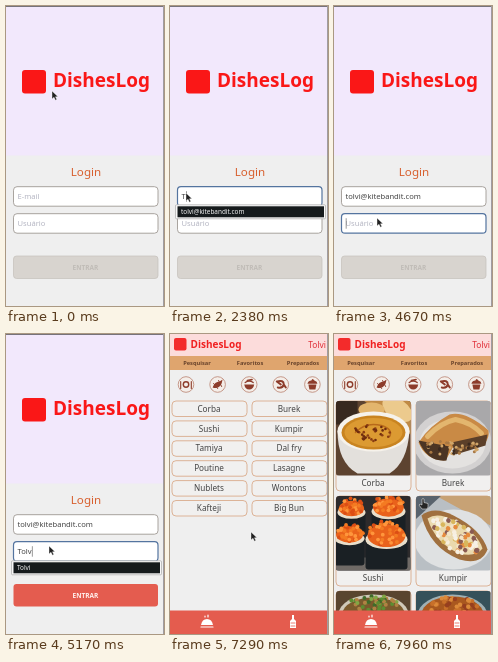
Animation of 158x300 px, one loop 8 s. Source, as an HTML page:

```html
<!DOCTYPE html>
<html lang="pt">
<head>
<meta charset="utf-8">
<style>
html, body { margin: 0; width: 100%; height: 100%; overflow: hidden; background: #efefef; }
svg { display: block; width: 100vw; height: 100vh; font-family: "Noto Sans", "Open Sans", sans-serif; }
.bold { font-weight: 700; }
</style>
</head>
<body>
<svg id="stage" viewBox="0 0 158 300"></svg>
<script>
const LOOP = 8000, NAME = 'Tolvi', MAIL = 'tolvi@kitebandit.com', APP = 'DishesLog';
const $ = id => document.getElementById(id);

// Markup helpers
const rect = (x, y, w, h, fill, r = 0, more = '') =>
  `<rect x="${x}" y="${y}" width="${w}" height="${h}" rx="${r}" fill="${fill}" ${more}/>`;
const oval = (x, y, rx, ry, fill, more = '') =>
  `<ellipse cx="${x}" cy="${y}" rx="${rx}" ry="${ry}" fill="${fill}" ${more}/>`;
const dot = (x, y, r, fill, more) => oval(x, y, r, r, fill, more);
const path = (d, fill, more = '') => `<path d="${d}" fill="${fill}" ${more}/>`;
const line = (d, color, w = 1) => path(d, 'none', `stroke="${color}" stroke-width="${w}" stroke-linecap="round"`);
const text = (x, y, size, fill, s, more = '') =>
  `<text x="${x}" y="${y}" font-size="${size}" fill="${fill}" ${more}>${s}</text>`;
const mid = 'text-anchor="middle"', boldMid = mid + ' class="bold"';
const group = (id, body) => `<g id="${id}">${body}</g>`;
const at = (x, y, body) => `<g transform="translate(${x} ${y})">${body}</g>`;

let seed = 7;
const rnd = () => (seed = seed * 16807 % 2147483647) / 2147483647;
const scatter = (n, x, y, rx, ry, size, colors) => Array.from({length: n}, () => {
  const a = rnd() * 6.28, d = Math.sqrt(rnd());
  return dot(x + rx * d * Math.cos(a), y + ry * d * Math.sin(a), size, colors[rnd() * colors.length | 0]);
}).join('');

// Login page
const field = (id, y, hint) =>
  rect(7.5, y, 144.5, 19.5, '#fff', 3.5, `id="${id}Box"`) +
  text(11.5, y + 12.2, 7.6, '#b4b5c2', hint, `id="${id}Text"`) +
  rect(0, y + 4.5, .6, 10.5, '#555', 0, `id="${id}Caret"`);
const popup = (id, y, s) => group(id,
  rect(5.5, y, 150, 14, '#f7f7f7', 1, 'stroke="#aaa" stroke-width=".7"') +
  rect(7.5, y + 1.5, 146.5, 11, '#151a1c') + text(11, y + 9.3, 6.4, '#f4f4f4', s));

const login = group('login',
  rect(0, 0, 158, 300, '#efefef') + rect(0, 0, 158, 149.5, '#f2e8fc') + rect(0, 0, 158, 1, '#77737b') +
  rect(16, 64, 24, 23.5, '#fa1717', 3) + text(47, 81, 19, '#fa1717', APP, 'class="bold"') +
  text(80, 170.3, 11.6, '#d8602f', 'Login', mid) +
  field('mail', 180.7, 'E-mail') + field('user', 207.7, 'Usuário') +
  group('button', rect(7.5, 250, 144.5, 22.5, '#d8d4cf', 3, 'id="face"') +
    text(79.5, 264, 6.5, '#fff', 'ENTRAR', boldMid + ' id="label"')) +
  popup('mailPop', 198.8, MAIL) + popup('userPop', 226.8, NAME));

// Flat food pictures, 75 by 75
const roll = (x, y, r, h) =>
  rect(x - r, y, r * 2, h, '#1a2024', 3) + oval(x, y + 1, r, r * .45, '#e9dfcb') +
  oval(x, y - 3, r * .9, r * .55, '#e9621b') +
  scatter(34, x, y - 5, r * .9, r * .6, 1.9, ['#f47b22', '#ff963c', '#dc4e14']);
const foods = [
  rect(0, 0, 75, 75, '#5d4330') + rect(0, 0, 22, 24, '#38291f') +
    path('M28 0H75V34L52 18Z', '#c08a45') + oval(62, 9, 17, 10, '#ecca8d', 'transform="rotate(35 62 9)"') +
    oval(36, 9, 13, 7, '#e3b56d') +
    path('M2 30Q2 62 22 73H54Q72 62 74 30Z', '#e3e0dc') + oval(38, 31, 36, 20, '#f6f2eb') +
    oval(38, 32, 32, 17, '#c98420') + oval(38, 32, 29, 14.5, '#dc9a32') +
    line('M20 32Q30 21 46 25Q58 29 54 36', '#b8691a', 1.6) +
    scatter(30, 36, 32, 19, 9, 1.3, ['#8a3d12', '#6f2c0e']),
  rect(0, 0, 75, 75, '#a9a8aa') + oval(37, 42, 39, 31, '#d3d1d1') + oval(37, 43, 33, 25, '#e4e2e0') +
    path('M3 42Q14 25 34 14Q50 10 73 30Q74 36 70 42L38 46L30 60Q10 60 3 42Z', '#c98a45') +
    line('M12 36Q25 22 40 19Q56 22 66 33', '#e3b66e', 5) +
    path('M3 40L34 46L31 60Q12 62 3 40Z', '#4c3524') + path('M36 42L72 34L70 45L40 54Z', '#5b3f29') +
    scatter(44, 36, 47, 31, 7, 1.5, ['#a97843', '#3c2a1f', '#d1a66a']),
  rect(0, 0, 75, 75, '#2d2b2c') + rect(0, 62, 75, 13, '#6f6a66') +
    roll(16, 16, 14, 22) + roll(53, 15, 17, 24) + roll(14, 42, 15, 28) + roll(51, 43, 21, 31),
  rect(0, 0, 75, 75, '#b9bfc4') + path('M20 0H75V30Z', '#c7a275') + path('M0 0H26L0 24Z', '#59636d') +
    oval(38, 44, 39, 30, '#dfe1e2') +
    path('M6 20Q18 10 38 20Q66 34 72 54Q66 70 44 64Q14 52 6 20Z', '#a0703f') +
    path('M12 23Q22 16 38 25Q62 37 67 53Q60 62 44 58Q20 48 12 23Z', '#ead9ae') +
    `<g transform="rotate(32 40 40)">` +
    scatter(70, 40, 40, 27, 14, 2.3, ['#f6f1e6', '#f2e3c6', '#e58a3e', '#d9b65c', '#8a5a52', '#f7efe0']) + '</g>',
  rect(0, 0, 75, 75, '#59452f') + oval(38, 24, 35, 20, '#cfc9b8') + oval(38, 23, 31, 16, '#7b5a2c') +
    scatter(45, 38, 13, 25, 8, 2, ['#5d8d31', '#3f6b2a', '#b08243', '#81a744']),
  rect(0, 0, 75, 75, '#35515a') + oval(37, 25, 35, 21, '#9fb0b4') + oval(37, 24, 31, 18, '#a9581f') +
    scatter(40, 37, 15, 25, 9, 2.2, ['#dc8a3a', '#963f1f', '#c8702a'])
];

const dishes = ['Corba', 'Burek', 'Sushi', 'Kumpir', 'Tamiya', 'Dal fry',
  'Poutine', 'Lasagne', 'Nublets', 'Wontons', 'Kafteji', 'Big Bun'];
const cards = dishes.map((s, i) => group('card' + i,
  rect(.5, .5, 75, 15.5, '#f1f0ef', 4, `stroke="#d7a481" stroke-width=".8" id="frame${i}"`) +
  `<g id="photo${i}" clip-path="url(#crop)">${foods[i] || ''}</g>` +
  text(37.5, 11.2, 8.2, '#444', s, `${mid} id="dish${i}"`))).join('');

const brown = '#8d3c2b';
const icons = [
  dot(0, 0, 3.4, brown) + dot(0, 0, 2, '#f4eee9') + line('M-5.3 -3V4M5.3 -3V4', brown, 1.1),
  path('M-5 3Q-3 -3 2 -3L5 -5L4 -1Q1 5 -5 3Z', brown) + line('M-4 -1L0 4M1 -4L4 2', brown),
  path('M-5 0H5Q4 5 0 5Q-4 5 -5 0Z', brown) + line('M-4 -2Q0 -5 4 -2M-2 -4L3 -5', brown, 1.3),
  line('M-4 -3Q3 -5 3 0Q2 4 -3 3M-4 -3L0 0M3 0L5 3', brown, 2),
  path('M-4 0H4L3 5H-3Z', brown) + path('M-5 -.7Q-4 -4 -1 -4Q0 -7 2 -4Q5 -3 5 -.7Z', brown)
].map((s, i) => at(16 + i * 31.6, 50.5, dot(0, 0, 7.8, '#f4eee9', 'stroke="#b98270" stroke-width=".8"') + s)).join('');

const home = group('home',
  rect(0, 0, 158, 300, '#efefef') + cards + icons +
  rect(0, 0, 158, 22, '#fcdcdb') + rect(4, 4, 12.5, 12.5, '#f32b2b', 2) +
  text(20.5, 13.8, 10, '#f02020', APP, 'class="bold"') + text(156, 14.3, 8.4, '#e02c35', NAME, 'text-anchor="end"') +
  rect(0, 22, 158, 14, '#dfa56e') +
  ['Pesquisar', 'Favoritos', 'Preparados'].map((s, i) =>
    text(27 + i * 53, 31.2, 5.7, '#68432b', s, boldMid)).join('') +
  rect(0, 276.5, 158, 23.5, '#e45c4e') +
  at(37, 288, path('M-6 3Q-5 -3 0 -3Q5 -3 6 3Z', '#fff') + line('M-6 5H6M-2 -5V-6M1 -5V-7', '#fff', 1.2)) +
  at(123, 288, path('M-1 -7H1V-3L3 -1V6H-3V-1L-1 -3Z', '#fff') + line('M-2 1H2M-2 4H2', '#e45c4e', .8)));

const pointer = group('pointer',
  group('arrow', path('M0 0V8L2 6.3L3.4 9.2L4.8 8.5L3.5 5.8H6Z', '#222', 'stroke="#fff" stroke-width=".4"')) +
  group('beam', line('M-2 0H2M0 0V8M-2 8H2', '#a4a4ac', .8)) +
  group('hand', path('M-1 0Q0 -1 1 0V3.5L5 4.5V8L4 10H-1L-4 6L-3 5L-1 6Z', '#252525', 'stroke="#fff" stroke-width=".5"')));

$('stage').innerHTML = '<clipPath id="crop"><rect x=".5" y=".5" width="75" height="75" rx="3"/></clipPath>' +
  login + home + rect(157, 0, 1, 300, '#a09da2') + pointer;

// State over time
const show = (id, on) => $(id).style.display = on ? '' : 'none';
const set = (id, o) => { for (const k in o) $(id).setAttribute(k, o[k]); };
const track = [[0, 46, 85], [590, 46, 85], [1000, 38, 120], [1700, 16, 187], [2480, 16, 187], [2850, 40, 204],
  [3710, 46, 204], [4080, 43, 212], [5400, 43, 212], [6050, 74, 264], [6700, 74, 264], [7200, 81, 198],
  [7400, 81, 198], [7780, 89, 165], [8000, 89, 165]];
const loaded = [7380, 7540, 7680];

function mouseAt(t) {
  const i = track.findIndex(k => k[0] > t), [t0, x0, y0] = track[i - 1], [t1, x1, y1] = track[i];
  const u = (t - t0) / (t1 - t0), e = u * u * (3 - 2 * u);
  return [x0 + (x1 - x0) * e, y0 + (y1 - y0) * e];
}

function drawField(id, value, hint, focus) {
  const el = $(id + 'Text');
  el.textContent = value || hint;
  set(id + 'Text', {fill: value ? '#444' : '#b4b5c2'});
  set(id + 'Box', {stroke: focus ? '#54749f' : '#a09a95', 'stroke-width': focus ? 1.2 : .9});
  show(id + 'Caret', focus);
  if (focus) set(id + 'Caret', {x: 11.8 + (value ? el.getComputedTextLength() : 0)});
}

function drawLogin(t, hover) {
  const mail = t < 2200 ? '' : t < 2900 ? MAIL[0].toUpperCase() : MAIL;
  const typed = [4680, 4840, 5000, 5120, 5380].filter(k => t >= k).length;
  drawField('mail', mail, 'E-mail', t >= 1800 && t < 4140);
  drawField('user', NAME.slice(0, typed), 'Usuário', t >= 4140 && t < 5640);
  show('mailPop', t >= 2200 && t < 2900);
  show('userPop', typed > 0 && t < 5560);
  const ready = typed > 2;
  set('face', {fill: !ready ? '#d8d4cf' : hover ? '#d0362b' : '#e45c4f',
    stroke: ready ? 'none' : '#c5c0ba', 'stroke-width': .7});
  set('label', {fill: ready ? '#fff0ed' : '#c0bcb7'});
  set('button', {transform: hover ? 'translate(79.5 261.3) scale(.975) translate(-79.5 -261.3)' : ''});
}

function drawHome(t) {
  let y = 66.5;
  for (let row = 0; row < 6; row++) {
    const grow = t >= loaded[row] ? 74.5 : 0;
    for (let i = row * 2; i < row * 2 + 2; i++) {
      set('card' + i, {transform: `translate(${i % 2 ? 81.5 : 1.5} ${y})`});
      set('frame' + i, {height: 15.5 + grow});
      set('dish' + i, {y: 11.2 + grow});
      show('photo' + i, grow);
    }
    y += 19.9 + grow + (grow ? .6 : 0);
  }
}

function frame(now) {
  const t = now % LOOP, [x, y] = mouseAt(t), atHome = t >= 6620;
  const hover = atHome ? x > 82 && y < 190 : y > 250;
  show('login', !atHome);
  show('home', atHome);
  atHome ? drawHome(t) : drawLogin(t, hover);
  const beam = t >= 3000 && t < 3900;
  show('hand', hover);
  show('beam', beam);
  show('arrow', !hover && !beam);
  set('pointer', {transform: `translate(${x} ${y})`});
  requestAnimationFrame(frame);
}
requestAnimationFrame(frame);
</script>
</body>
</html>
```
